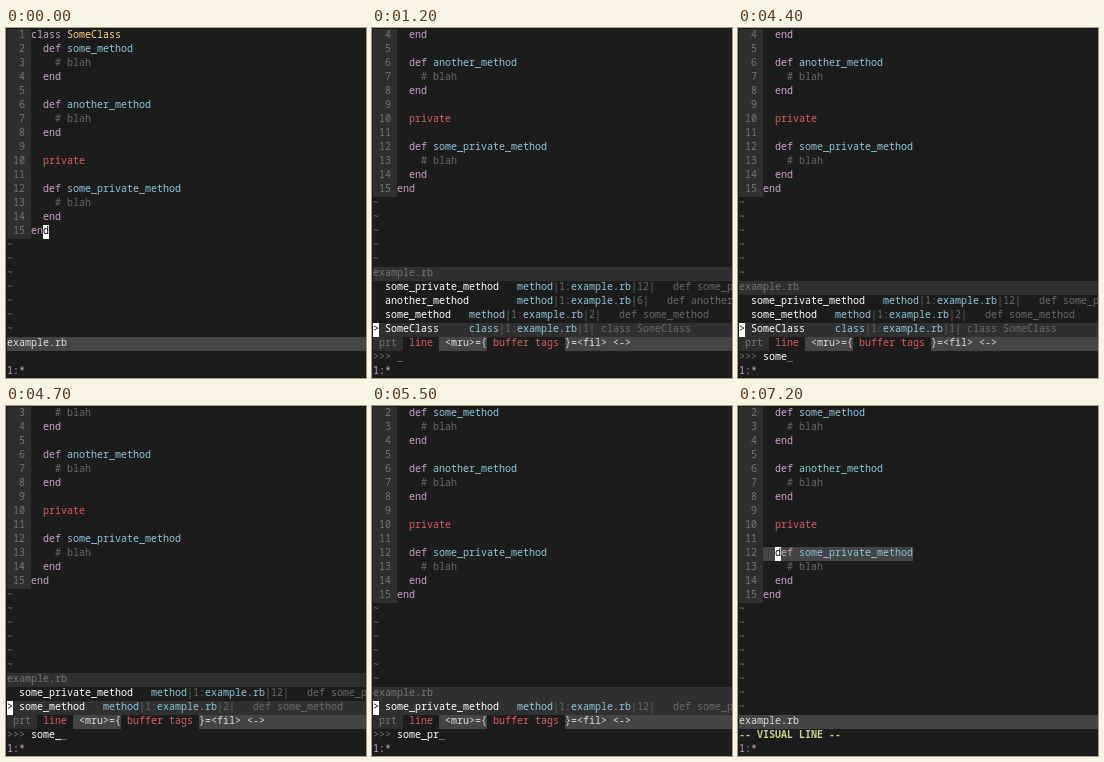
These frames come from a looping animation (360x350 px, 8 s). An HTML page with a canvas:

```html
<!DOCTYPE html>
<html lang="en">
<head>
<meta charset="utf-8">
<title>Fuzzy tag search in a terminal editor</title>
<style>
html, body { margin: 0; width: 100%; height: 100%; overflow: hidden; background: #1c1c1c; }
canvas { display: block; }
</style>
</head>
<body>
<canvas id="screen" width="360" height="350"></canvas>
<script>
const ctx = document.getElementById('screen').getContext('2d');
const LOOP = 8000, CELL_W = 6, CELL_H = 14, COLS = 60;
const C = {
  bg: '#1c1c1c', gutter: '#2e2e2e', number: '#747474', dim: '#686868',
  text: '#e0e0e0', white: '#ffffff', bar: '#444444', line: '#303030',
  key: '#d0a0d0', name: '#8cc8e0', type: '#ffd787', red: '#d75f5f', mode: '#c3d68a'
};

const code = `class SomeClass
  def some_method
    # blah
  end

  def another_method
    # blah
  end

  private

  def some_private_method
    # blah
  end
end`.split('\n');

// Search results, best match last: name, kind, line number, column of the kind
const tags = [
  ['some_private_method', 'method', 12, 24],
  ['another_method', 'method', 6, 24],
  ['some_method', 'method', 2, 16],
  ['SomeClass', 'class', 1, 16]
];

const typing = [[3400, 's'], [3500, 'so'], [3600, 'som'], [3700, 'some'],
  [4700, 'some_'], [4900, 'some_p'], [5100, 'some_pr']];

function fill(col, row, width, color) {
  ctx.fillStyle = color;
  ctx.fillRect(1 + col * CELL_W, 1 + row * CELL_H, width * CELL_W, CELL_H);
}

// Writes a string and returns the column after it
function put(col, row, str, color, weight = 400) {
  ctx.font = `${weight} 10px "Noto Sans Mono", "DejaVu Sans Mono", monospace`;
  ctx.fillStyle = color;
  ctx.fillText(str, 1 + col * CELL_W, 10 + row * CELL_H);
  return col + str.length;
}

function cursor(col, row, char) {
  fill(col, row, 1, C.white);
  put(col, row, char, '#000000');
}

function codeLine(row, str) {
  for (const { 0: word, index } of str.matchAll(/#.*|\w+/g)) {
    const color = word[0] === '#' ? C.dim
      : /^(class|def|end)$/.test(word) ? C.key
      : word === 'private' ? C.red
      : word === 'SomeClass' ? C.type : C.name;
    put(4 + index, row, word, color);
  }
}

function editor(top, rows, active, visual) {
  for (let row = 0; row < rows; row++) {
    const n = top + row;
    if (n > code.length) {
      put(0, row, '~', C.number);
      continue;
    }
    fill(0, row, 4, C.gutter);
    if (visual && n === 12) fill(4, row, code[n - 1].length, C.bar);
    put(0, row, String(n).padStart(3), C.number);
    codeLine(row, code[n - 1]);
  }
  fill(0, rows, COLS, active ? C.bar : C.line);
  put(0, rows, 'example.rb', active ? C.text : C.number);
}

function tagLine(row, [name, kind, n, col]) {
  put(2, row, name, C.white);
  col = put(col, row, kind, C.name);
  col = put(col, row, '|1:', C.dim);
  col = put(col, row, 'example.rb', C.name);
  put(col, row, `|${n}| ${code[n - 1]}`, C.dim);
}

function finder(query) {
  const fuzzy = new RegExp([...query].join('.*'), 'i');
  const found = tags.filter(tag => fuzzy.test(tag[0]));
  const first = 22 - found.length;
  editor(Math.min(4, found.length + 1), first - 1, false);

  fill(0, 21, COLS, C.line);
  found.forEach((tag, i) => tagLine(first + i, tag));
  cursor(0, 21, '>');

  fill(0, 22, COLS, C.bar);
  fill(0, 22, 5, C.gutter);
  fill(5, 22, 6, C.bg);
  fill(19, 22, 13, C.bg);
  put(1, 22, 'prt', C.number);
  put(6, 22, 'line', C.red);
  put(12, 22, '<mru>={', C.text);
  put(20, 22, 'buffer tags', C.red);
  put(32, 22, '}=<fil> <->', C.text);

  put(0, 23, '>>>', C.number);
  put(put(4, 23, query, C.white), 23, '_', C.number);
}

function draw(t) {
  ctx.fillStyle = C.bg;
  ctx.fillRect(0, 0, 360, 350);
  if (t < 1100) {
    editor(1, 22, true);
    cursor(6, 14, 'd');
  } else if (t < 6000) {
    const typed = typing.filter(([start]) => t >= start).pop();
    finder(typed ? typed[1] : '');
  } else {
    const visual = t >= 6700;
    editor(2, 22, true, visual);
    cursor(6, 10, 'd');
    if (visual) put(0, 23, '-- VISUAL LINE --', C.mode, 700);
  }
  put(0, 24, '1:*', C.key);
}

const begin = performance.now();
function tick() {
  draw((performance.now() - begin) % LOOP);
  requestAnimationFrame(tick);
}
tick();
</script>
</body>
</html>
```
